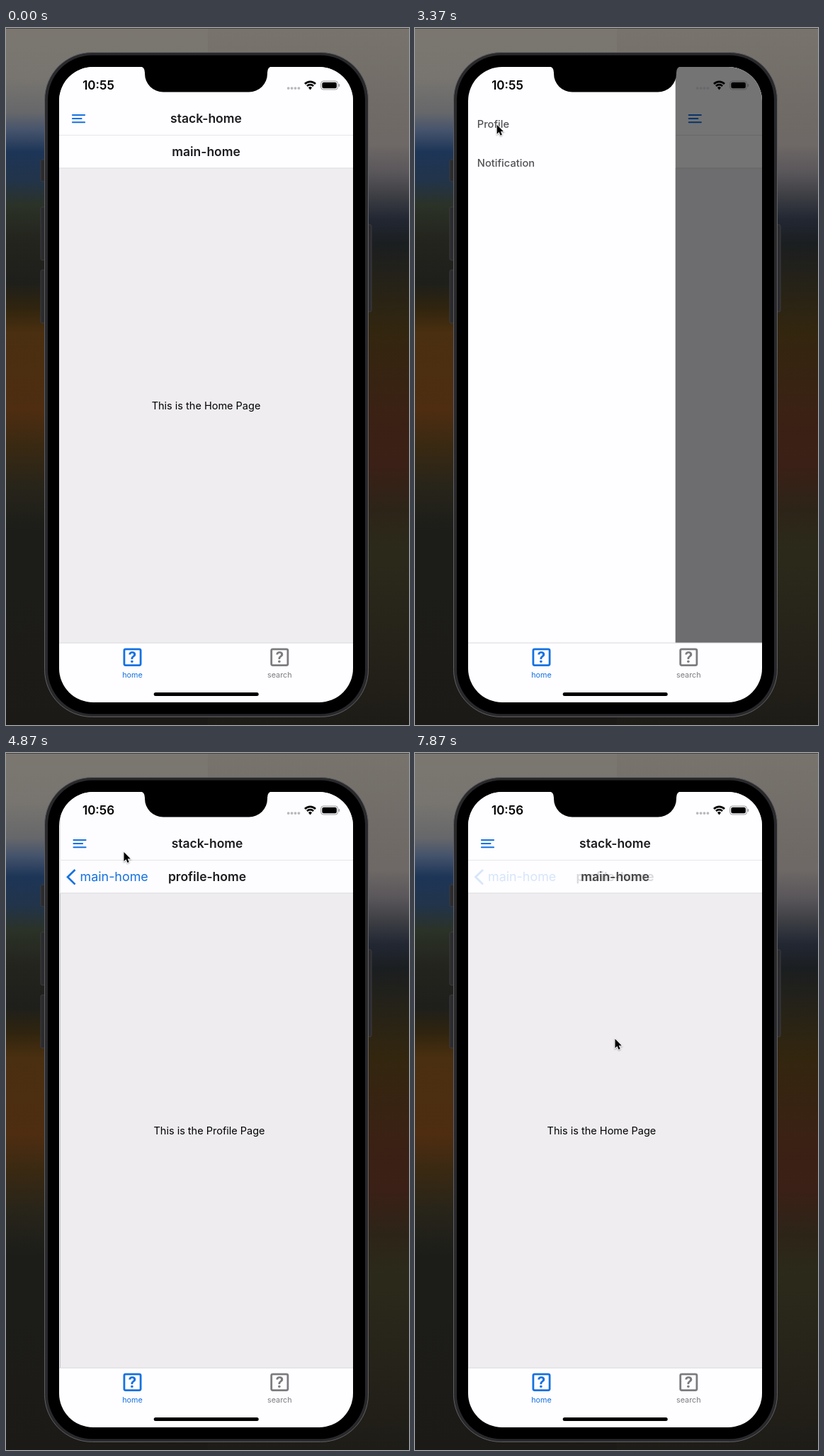
These frames come from a looping animation (569x985 px, 8000 ms). An HTML page with a canvas:

```html
<!DOCTYPE html>
<html lang="en">
<head>
<meta charset="utf-8">
<title>Drawer and stack navigation</title>
<style>
html, body { margin: 0; width: 100%; height: 100%; overflow: hidden; background: #1e1c17; }
canvas { display: block; }
</style>
</head>
<body>
<canvas id="stage" width="569" height="985"></canvas>
<script>
const g = document.getElementById('stage').getContext('2d');
const LOOP = 8000, STEP = 125;
const X = 75, Y = 55, W = 415, H = 898, TAB = 869, DRAWER = 298;
const BLUE = '#1472e2', GREY = '#7c7b7e', WHITE = '#fefdff', PAGE = '#efedf0', INK = '#1c1c1e';

const LEFT = { 0: '#7b7770', 70: '#787570', 120: '#66676a', 145: '#45536c', 175: '#1d3557',
  215: '#22344a', 250: '#2b3228', 300: '#23241d', 360: '#1e1f1b', 395: '#30240f', 430: '#4a2f10',
  540: '#4e2d11', 590: '#3a2912', 650: '#27241a', 710: '#1c1d19', 985: '#1c1a17' };
const RIGHT = { 0: '#78746d', 100: '#716c67', 165: '#6e6866', 205: '#59565a', 235: '#3f4045',
  270: '#222733', 305: '#1b1e20', 360: '#252218', 430: '#33260f', 550: '#3b2114', 620: '#3a2016',
  680: '#2d2418', 740: '#2b2a1a', 860: '#26231a', 985: '#1e1c17' };

// Critically damped spring, 0 to 1, with t in ms
function spring(t) {
  const u = Math.max(0, t) * 0.01826;
  return 1 - (1 + u) * Math.exp(-u);
}

// Linear interpolation through rows of [time, ...values]
function track(t, rows) {
  const i = rows.findIndex(r => r[0] > t);
  if (i < 0) return rows[rows.length - 1].slice(1);
  if (i === 0) return rows[0].slice(1);
  const a = rows[i - 1], b = rows[i], k = (t - a[0]) / (b[0] - a[0]);
  return a.slice(1).map((v, j) => v + (b[j + 1] - v) * k);
}

function rect(x, y, w, h, color) {
  g.fillStyle = color;
  g.fillRect(x, y, w, h);
}

function round(x, y, w, h, r, fill, stroke, width = 1) {
  g.beginPath();
  g.roundRect(x, y, w, h, r);
  if (fill) { g.fillStyle = fill; g.fill(); }
  if (stroke) { g.strokeStyle = stroke; g.lineWidth = width; g.stroke(); }
}

function text(str, x, y, size, weight, color, align = 'left', alpha = 1) {
  g.globalAlpha = alpha;
  g.font = `${weight} ${size}px Inter, sans-serif`;
  g.textAlign = align;
  g.fillStyle = color;
  g.fillText(str, x, y);
  g.globalAlpha = 1;
}

function clipped(x, y, w, h, r, draw) {
  g.save();
  g.beginPath();
  g.roundRect(x, y, w, h, r);
  g.clip();
  draw();
  g.restore();
}

function wallpaper() {
  [[LEFT, 0], [RIGHT, 285]].forEach(([stops, x]) => {
    const grad = g.createLinearGradient(0, 0, 0, 985);
    for (const y in stops) grad.addColorStop(y / 985, stops[y]);
    rect(x, 0, 285, 985, grad);
  });
  rect(0, 0, 569, 1, '#45433f');
}

function phoneBody() {
  [[186, 31], [253, 75], [342, 75]].forEach(([y, h]) => round(49, y, 8, h, 2, '#2b2b2e', '#3c3c40'));
  round(508, 278, 8, 123, 2, '#2b2b2e', '#3c3c40');
  round(54.5, 34.5, 457, 939, 67, '#29292c', '#606064');
  round(59, 38.5, 448, 931, 63, '#000');
}

function notch() {
  g.fillStyle = '#000';
  g.beginPath();
  g.moveTo(189, 54);
  g.quadraticCurveTo(196, 55, 196, 63);
  g.arcTo(196, 90.5, 221, 90.5, 26);
  g.arcTo(369, 90.5, 369, 63, 26);
  g.lineTo(369, 63);
  g.quadraticCurveTo(369, 55, 376, 54);
  g.fill();
}

function statusBar(t) {
  text(t < 3750 ? '10:55' : '10:56', 130.5, 87, 17, 600, '#000', 'center');
  for (let i = 0; i < 4; i++) round(396.8 + i * 4.9, 83.2, 3.8, 3.8, 1.9, 'rgba(90,90,95,.42)');
  g.strokeStyle = '#000';
  g.lineWidth = 2.7;
  [6.4, 10.6].forEach(r => {
    g.beginPath();
    g.arc(429.5, 86.5, r, -Math.PI * 0.75, -Math.PI * 0.25);
    g.stroke();
  });
  g.fillStyle = '#000';
  g.beginPath();
  g.moveTo(429.5, 87.5);
  g.arc(429.5, 86.5, 3.4, -Math.PI * 0.77, -Math.PI * 0.23);
  g.fill();
  round(444.6, 75, 24, 12, 3.6, null, 'rgba(60,60,65,.5)');
  round(446.3, 76.7, 20.6, 8.6, 2.2, '#000');
  round(469.6, 79, 1.6, 4, 1, 'rgba(60,60,65,.5)');
}

function menuIcon(alpha) {
  g.globalAlpha = alpha;
  [[122, 19], [127, 14.5], [132.2, 19]].forEach(([y, w]) => round(93, y, w, 2.1, 0.8, BLUE));
  g.globalAlpha = 1;
}

// Both stack screens, with push going from 0 (home) to 1 (profile)
function content(t, push) {
  rect(X, Y, W, TAB - Y, PAGE);
  rect(X, Y, W, 143, WHITE);
  rect(X, 151, W, 1, '#e6e5e8');
  rect(X, 197.5, W, 1, '#dcdbde');
  menuIcon(t >= 2870 && t < 3300 ? 0.4 : 1);
  text('stack-home', 282.5, 134.3, 17.5, 600, INK, 'center');
  text('main-home', 282.5, 181, 17.5, 600, INK, 'center', Math.pow(1 - push, 1.3));

  if (push > 0) {
    const shown = Math.min(1, push * 1.1);
    text('profile-home', 282.5, 181, 17.5, 600, INK, 'center', shown);
    text('main-home', 103, 181.4, 17.9, 400, BLUE, 'left', shown);
    g.globalAlpha = shown;
    g.strokeStyle = BLUE;
    g.lineWidth = 2.7;
    g.beginPath();
    g.moveTo(96, 165);
    g.lineTo(85.5, 175.3);
    g.lineTo(96, 185.6);
    g.stroke();
    g.globalAlpha = 1;
  }

  const edge = W * (1 - push);
  clipped(X, 199, edge, TAB - 199, 0, () =>
    text('This is the Home Page', 282.5 - 0.3 * W * push, 538.7, 14.5, 400, '#000', 'center'));
  if (push > 0)
    text('This is the Profile Page', 282.5 + edge, 538.7, 14.5, 400, '#000', 'center');
}

function drawer(t, open) {
  const dx = DRAWER * open, pressed = t >= 4370 && t < 4700;
  rect(X + dx, Y, W, TAB - Y, `rgba(0,0,0,${0.55 * open})`);
  rect(X, Y, dx, TAB - Y, WHITE);
  const x = 93 + dx - DRAWER;
  text('Profile', x, 141.3, 14.7, 500, pressed ? '#cbcacd' : '#535255');
  text('Notification', x, 195.6, 14.7, 500, '#535255');
}

function tab(label, x, color) {
  round(x - 11.6, 877.8, 23.2, 22.8, 2, null, color, 2.8);
  text('?', x, 896.8, 21, 700, color, 'center');
  text(label, x, 918, 10.8, 400, color, 'center');
}

function tabBar() {
  rect(X, TAB, W, 90, WHITE);
  rect(X, TAB - 0.5, W, 1, '#dad9dc');
  tab('home', 178.5, BLUE);
  tab('search', 386.3, GREY);
  round(208.7, 939, 148, 5, 2.5, '#000');
}

function cursor(t) {
  if (t < 1750) return;
  const [x, y] = track(t, [
    [1750, 140, 300], [2250, 113, 190], [2625, 105, 136], [3250, 105, 136], [4000, 166, 140],
    [4875, 166, 140], [5875, 237, 290], [6375, 237, 290], [7375, 78, 400], [7500, 78, 400],
    [7625, 120, 401], [7875, 282, 404]]);
  g.save();
  g.translate(x + 0.5, y);
  g.shadowColor = 'rgba(0,0,0,.35)';
  g.shadowBlur = 2;
  g.shadowOffsetY = 1;
  const tip = new Path2D('M0 0V13L3 10.3 5 15 7.2 14 5.2 9.6H9.3Z');
  g.strokeStyle = '#fff';
  g.lineWidth = 1.6;
  g.stroke(tip);
  g.shadowColor = 'transparent';
  g.fillStyle = '#000';
  g.fill(tip);
  g.restore();
}

function draw(t) {
  const open = spring(t - 3047) * (1 - spring(t - 4469));
  const push = t < 7500 ? spring(t - 4491)
    : track(t, [[7500, 1], [7625, 0.92], [7750, 0.55], [7875, 0.153]])[0];
  wallpaper();
  phoneBody();
  clipped(X, Y, W, H, 48, () => {
    g.save();
    g.translate(DRAWER * open, 0);
    content(t, push);
    g.restore();
    drawer(t, open);
    tabBar();
    statusBar(t);
  });
  notch();
  cursor(t);
}

function frame(now) {
  draw(Math.floor((now % LOOP) / STEP + 0.05) * STEP % LOOP);
  requestAnimationFrame(frame);
}
requestAnimationFrame(frame);
</script>
</body>
</html>
```
